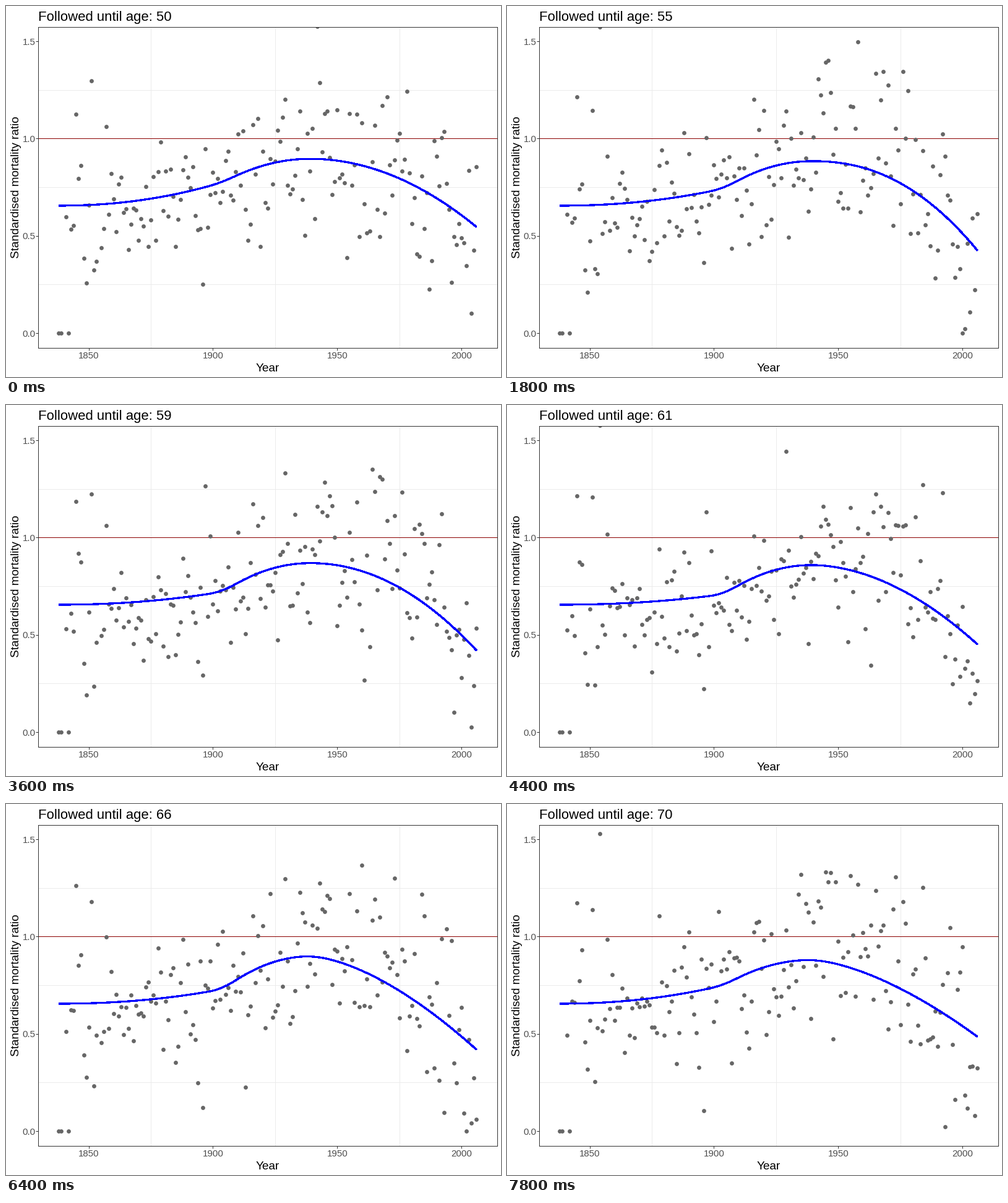
A matplotlib script for the animation above (8 s loop, 800 px wide and 600 px high).

```python
import numpy as np
import matplotlib.pyplot as plt
from matplotlib.animation import FuncAnimation

W, H, DPI = 800, 600, 100
PX = 72 / DPI                       # one pixel in points
FRAMES, STEP = 40, 200
AGE0, AGE1 = 50, 70

plt.rcParams["font.family"] = "Liberation Sans"

YEARS = np.arange(1838, 2007)
FIRST, BEND, TOP, LAST = 1838, 1904, 1939, 2006

# Trend keys: loop step, ratio at the bend, at the top, at the end, fall power
TREND_KEYS = np.array([
    (0, 0.776, 0.897, 0.547, 2.0),
    (5, 0.750, 0.889, 0.455, 2.3),
    (14, 0.735, 0.880, 0.391, 2.2),
    (22, 0.709, 0.860, 0.452, 1.9),
    (26, 0.711, 0.883, 0.423, 1.63),
    (32, 0.730, 0.900, 0.420, 1.6),
    (39, 0.750, 0.881, 0.486, 1.58),
])
START_RATIO = 0.655

# Cohorts that stay far from the trend
OUTLIERS = {1838: 0, 1839: 0, 1842: 0, 1841: 0.55, 1845: 1.15, 1848: 0.40,
            1849: 0.26, 1851: 1.15, 1852: 0.36, 1854: 1.48, 1857: 1.06,
            1894: 0.38, 1896: 0.24, 1918: 1.25, 1942: 1.24, 1945: 1.20}


def age_at(i):
    return AGE0 + (AGE1 - AGE0) * i / (FRAMES - 1)


def trend(age, years):
    """Slow rise, quicker rise to the top, then a fall; softened over a few years."""
    bend, top, end, power = (np.interp(age, age_at(TREND_KEYS[:, 0]), col)
                             for col in TREND_KEYS.T[1:])
    x = years[:, None] + np.linspace(-5, 5, 11)
    slow = np.clip((x - FIRST) / (BEND - FIRST), 0, 1) ** 2.1
    rise = 1 - np.clip((TOP - x) / (TOP - BEND), 0, 1) ** 2
    fall = np.maximum((x - TOP) / (LAST - TOP), 0) ** power
    y = (START_RATIO + (bend - START_RATIO) * slow
         + (top - bend) * rise + (end - top) * fall)
    return y.mean(axis=1)


def build_ratios():
    """One row per whole age; later cohorts wander more."""
    rng = np.random.default_rng(5)
    u = (YEARS - FIRST) / (LAST - FIRST)
    offset = rng.normal(0, 0.13, u.size)
    spread = 0.03 + 0.14 * u
    wander = rng.normal(0, 1, u.size) * spread / 0.6
    rows = []
    for age in range(AGE0, AGE1 + 1):
        home = trend(age, YEARS) + offset
        for year, ratio in OUTLIERS.items():
            home[year - FIRST] = ratio
        row = np.where(home == 0, 0, np.maximum(0, home + wander))
        row[1840 - FIRST] = np.nan          # empty cohort
        rows.append(row)
        wander = 0.8 * wander + rng.normal(0, 1, u.size) * spread
    return np.array(rows)


RATIOS = build_ratios()


def ratios_at(age):
    k = min(int(age) - AGE0, len(RATIOS) - 2)
    t = age - AGE0 - k
    return (1 - t) * RATIOS[k] + t * RATIOS[k + 1]


fig = plt.figure(figsize=(W / DPI, H / DPI), dpi=DPI, facecolor="white")


def put(x, y, s, size, color="black", **kw):
    return fig.text(x / W, 1 - y / H, s, fontsize=size * PX, color=color, **kw)


L, R, T, B = 52.4, 794.4, 33.6, 552.6
X0, X1, Y0, Y1 = 1829.8, 2014.5, -0.075, 1.575
ax = fig.add_axes([L / W, 1 - B / H, (R - L) / W, (B - T) / H])
ax.set_xlim(X0, X1)
ax.set_ylim(Y0, Y1)
ax.set_xticks([1850, 1900, 1950, 2000], labels=[])
ax.set_yticks([0, 0.5, 1, 1.5], labels=[])
ax.tick_params(length=4 * PX, width=PX, color="#333333")
for spine in ax.spines.values():
    spine.set(linewidth=PX, color="#333333")

for year in (1875, 1925, 1975):
    ax.axvline(year, color="#ebebeb", lw=PX, zorder=0)
for ratio in (0.25, 0.75, 1.25):
    ax.axhline(ratio, color="#ebebeb", lw=PX, zorder=0)
ax.axhline(1, color="#8b0000", lw=PX, zorder=1)

for year in (1850, 1900, 1950, 2000):
    x = L + (year - X0) * (R - L) / (X1 - X0)
    put(x, 570, str(year), 15, "#4d4d4d", ha="center")
for ratio in (0, 0.5, 1, 1.5):
    y = B - (ratio - Y0) * (B - T) / (Y1 - Y0)
    put(47.5, y + 5.6, f"{ratio:.1f}", 15, "#4d4d4d", ha="right")

put(423, 591, "Year", 19, ha="center")
put(21, 293, "Standardised mortality ratio", 19, ha="center",
    rotation=90, rotation_mode="anchor")
title = put(52, 24, "", 22.2)

dots, = ax.plot([], [], "o", ms=6.8 * PX, mfc="#666666", mec="none",
                antialiased=False, zorder=2)
curve, = ax.plot([], [], color="#0000ff", lw=2.3 * PX, antialiased=False,
                 solid_capstyle="butt", zorder=3)
grid = np.linspace(FIRST, LAST, 80)


def draw(i):
    age = age_at(i)
    title.set_text(f"Followed until age: {round(age)}")
    dots.set_data(YEARS, ratios_at(age))
    curve.set_data(grid, trend(age, grid))
    return title, dots, curve


anim = FuncAnimation(fig, draw, frames=FRAMES, interval=STEP, repeat=True)
plt.show()
```
